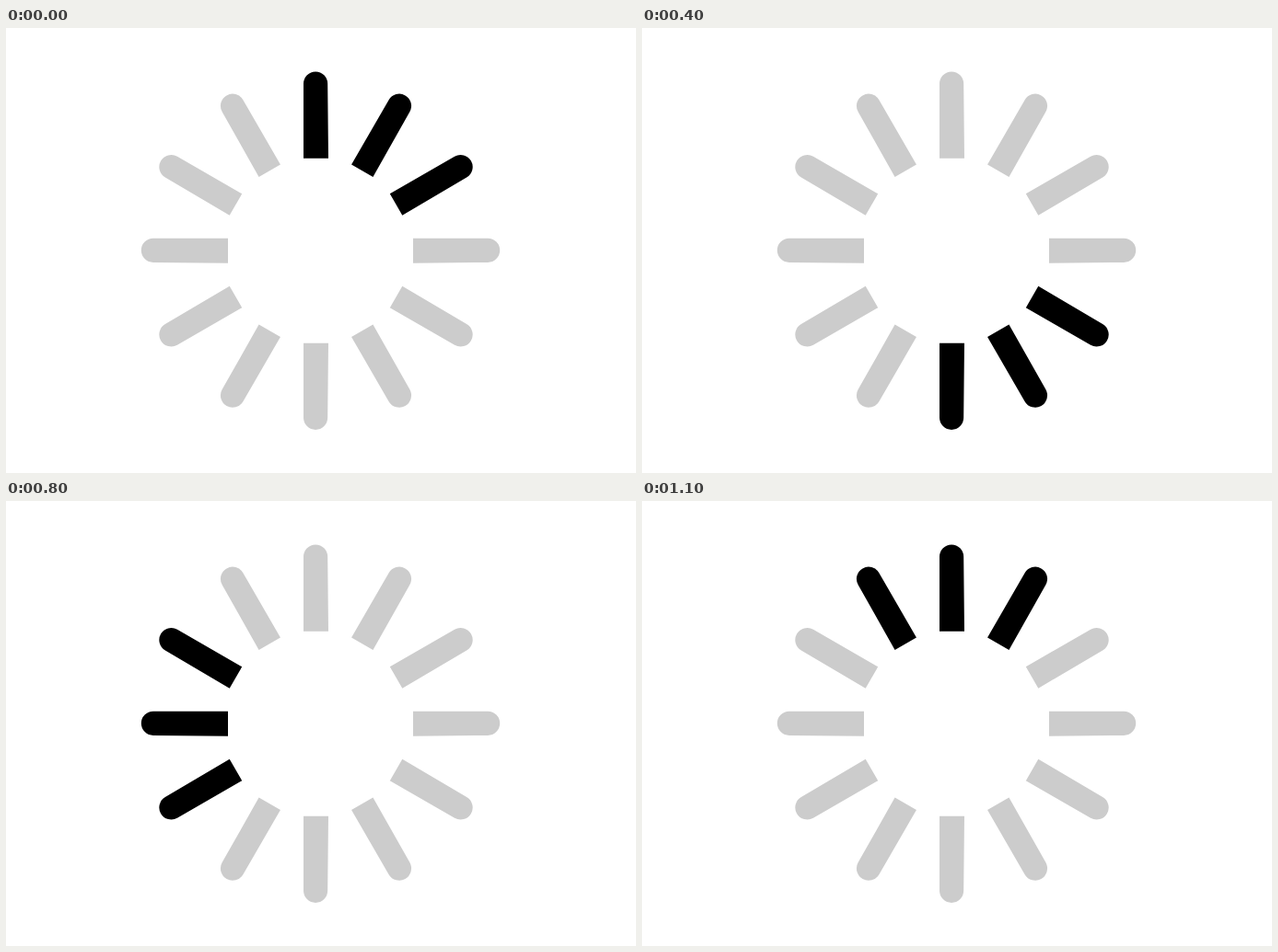
Animation of 684 by 484 pixels, one loop 1.2 s. Source, as an HTML page:

```html
<!DOCTYPE html>
<html lang="en">
<head>
<meta charset="utf-8">
<title>Spinner</title>
<style>
  html, body { margin: 0; width: 100%; height: 100%; overflow: hidden; background: #fff; }
  svg { display: block; }
</style>
</head>
<body>
<svg width="684" height="484" viewBox="0 0 684 484"></svg>
<script>
const COUNT = 12, LIT = 3, STEP = 100;
const svg = document.querySelector('svg');

// One bar pointing up from the hub, slightly narrower towards its round end.
const BAR = 'M-13.5-100.5V-181.6A13.1 13.1 0 0 1 12.7-181.6L13.5-100.5Z';

const bars = Array.from({ length: COUNT }, (_, i) => {
  const bar = document.createElementNS('http://www.w3.org/2000/svg', 'path');
  const x = i % 6 === 3 ? 341.5 : 336.5; // the level pair sits further right
  const mirror = [4, 5, 6, 9, 10, 11].includes(i) ? -1 : 1;
  bar.setAttribute('d', BAR);
  bar.setAttribute('transform', `translate(${x} 242.2) rotate(${i * 360 / COUNT}) scale(${mirror} 1)`);
  return svg.appendChild(bar);
});

function draw(time) {
  const head = Math.floor(time / STEP) % COUNT;
  bars.forEach((bar, i) => {
    const lit = (i - head + COUNT) % COUNT < LIT;
    bar.setAttribute('fill', lit ? '#000' : '#ccc');
  });
}

const start = performance.now();
function tick() {
  draw(performance.now() - start);
  requestAnimationFrame(tick);
}
tick();
</script>
</body>
</html>
```
